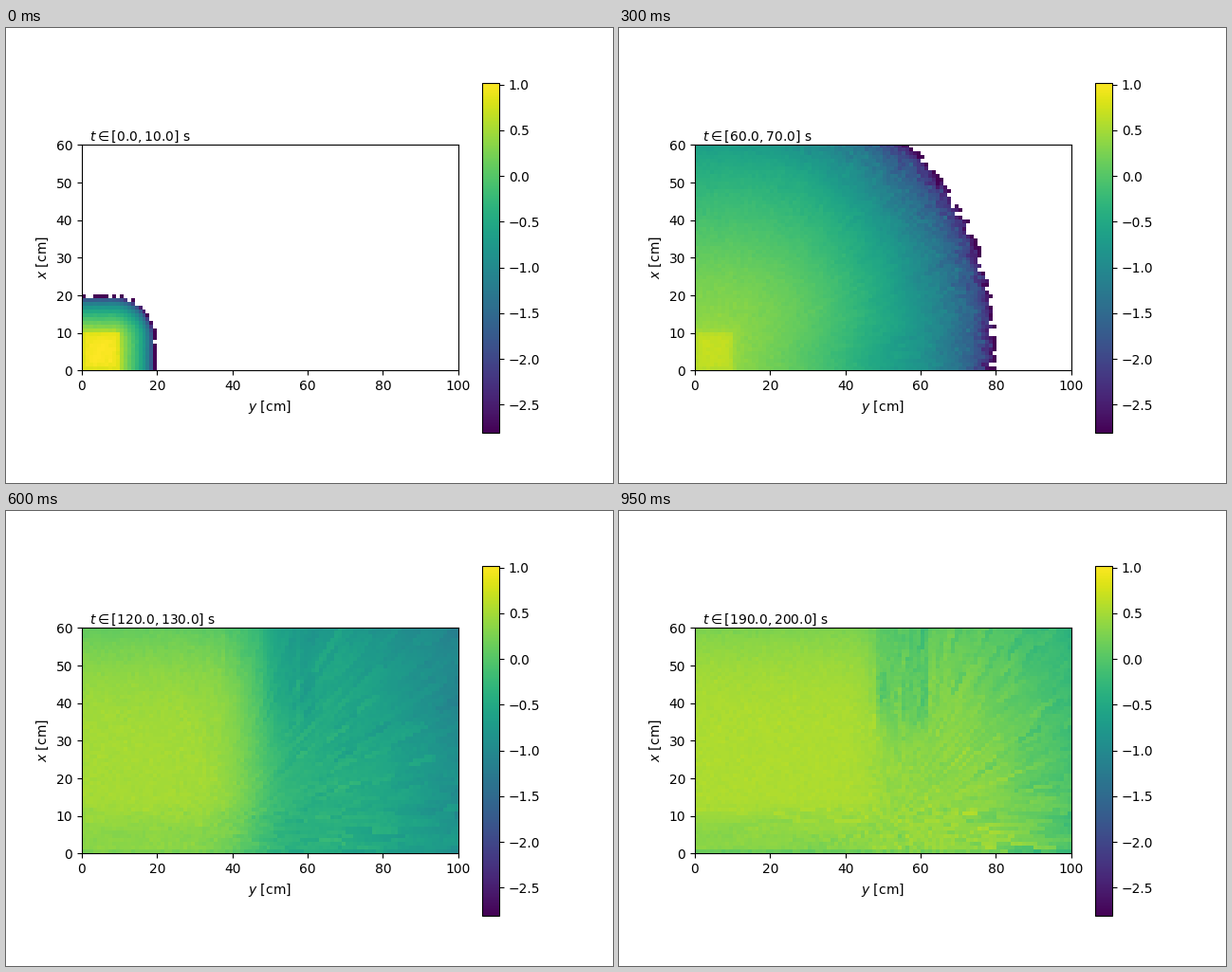
Write a matplotlib script that moves like this. It is 640x480 px and loops after 1000 ms.

```python
import numpy as np
import matplotlib.pyplot as plt
from matplotlib.animation import FuncAnimation

WIDTH, HEIGHT = 100, 60
FRAMES, INTERVAL = 20, 50
VMIN, VMAX = -2.81, 1.0222

Y, X = np.meshgrid(np.arange(WIDTH) + 0.5, np.arange(HEIGHT) + 0.5)
# Distance to the rounded corner emitter, and depth inside it
DIST = np.hypot(np.maximum(Y - 8, 0), np.maximum(X - 8, 0)) - 2
DEPTH = np.minimum.reduce([10 - X, 10 - Y, X, Y])
RAY = (np.arctan2(X, Y) * 100).astype(int)


def ramp(value, start, end):
    return np.clip((value - start) / (end - start), 0, 1)


def ease(value, start, end):
    part = ramp(value, start, end)
    return part * part * (3 - 2 * part)


def expanding(step, reach):
    """Log density while the emitter is on and the cloud spreads."""
    away = np.maximum(DIST, 0)
    weight = 1.35 + 1.05 * np.exp(-step)
    outside = 0.4 - 0.012 * away + 0.25 * np.exp(-away / 1.5)
    outside += weight * np.log10(np.maximum(1 - away / reach, 0.01))
    inside = 1.02 - 0.25 * np.exp(-np.maximum(DEPTH, 0) / 1.2)
    return np.where(DEPTH > 0, inside, outside)


def filling(step, reach):
    """Log density while the left room fills first, then the right one."""
    grow = ramp(step, 7, 14)
    low = ramp(X, 14, 4)

    fade = (0.7 - 0.4 * grow) * ramp(X, 20, 60) ** (1.3 + 2.5 * grow)
    left = 0.38 + 0.17 * grow - fade - 0.22 * grow * low

    right = -0.75 + 1.17 * ease(step, 8.5, 18)
    right = right - 0.45 * ramp(Y, 70, 100) ** 1.3 - 0.35 * (X / HEIGHT) ** 2

    border = 44 + 4 * grow - 7 * (1 - grow) * low
    share = 1 / (1 + np.exp((Y - border) / (9 - 6.5 * grow)))
    front = 1.3 * np.log10(np.clip((reach - DIST) / 25, 0.02, 1))
    return share * left + (1 - share) * right + front


def streaks(rng, step):
    """Noise that stays constant along short pieces of rays."""
    shift = ramp(step, 9, 14)
    dy, dx = Y - (5 + 47 * shift), X - (2 + 6 * shift)
    angle = ((np.arctan2(dx, dy) + np.pi) * 36).astype(int)
    radius = (np.hypot(dx, dy) / 7 + 0.37 * angle).astype(int)
    return rng.normal(size=(240, 120))[angle, radius % 120]


def density(step):
    rng = np.random.default_rng(40 + step)
    reach = 10 * (step + 1)
    late = ramp(step, 4, 8)
    field = (1 - late) * expanding(step, reach) + late * filling(step, reach)

    settled = ramp(step, 10, 14)
    near_front = ramp(DIST, reach - 25, reach) * ramp(step, 0, 3)
    grain = rng.normal(size=X.shape)
    field += grain * (0.018 + 0.17 * near_front ** 2)

    calm = 1 - 0.85 * settled * (Y < 46) * (X > 12)
    strength = 0.012 + 0.045 * ramp(Y + 0.4 * X, 35, 75)
    strength += 0.03 * settled * (X < 12)
    field += streaks(rng, step) * strength * calm * ramp(step, 1, 8)

    # Shaded column between the rooms
    column = (Y > 48) & (Y < 62)
    shade = settled * column * ramp(X, 28, 41) * (1 - 0.6 * ramp(X, 44, 60))
    field -= shade * (0.2 + 0.06 * rng.normal(size=WIDTH) + 0.07 * grain)
    field -= 0.17 * settled * (X < 1)

    ragged = (0.7 + reach / 40) * rng.random(160)[RAY] ** 2
    return np.where(DIST > reach - ragged, np.nan, np.clip(field, VMIN, VMAX))


fig, ax = plt.subplots(figsize=(6.4, 4.8), dpi=100)
image = ax.imshow(density(0), origin="lower", extent=(0, WIDTH, 0, HEIGHT),
                  cmap="viridis", vmin=VMIN, vmax=VMAX,
                  interpolation="nearest")
fig.colorbar(image)
ax.set_xlabel("$y$ [cm]")
ax.set_ylabel("$x$ [cm]")
ax.set_xticks(range(0, WIDTH + 1, 20))
ax.set_yticks(range(0, HEIGHT + 1, 10))
label = ax.text(0.02, 1.02, "", transform=ax.transAxes)


def update(step):
    image.set_data(density(step))
    label.set_text(rf"$t \in [{10 * step:.1f}, {10 * (step + 1):.1f}]$ s")
    return image, label


anim = FuncAnimation(fig, update, frames=FRAMES, interval=INTERVAL,
                     repeat=True, repeat_delay=0)
plt.show()
```
